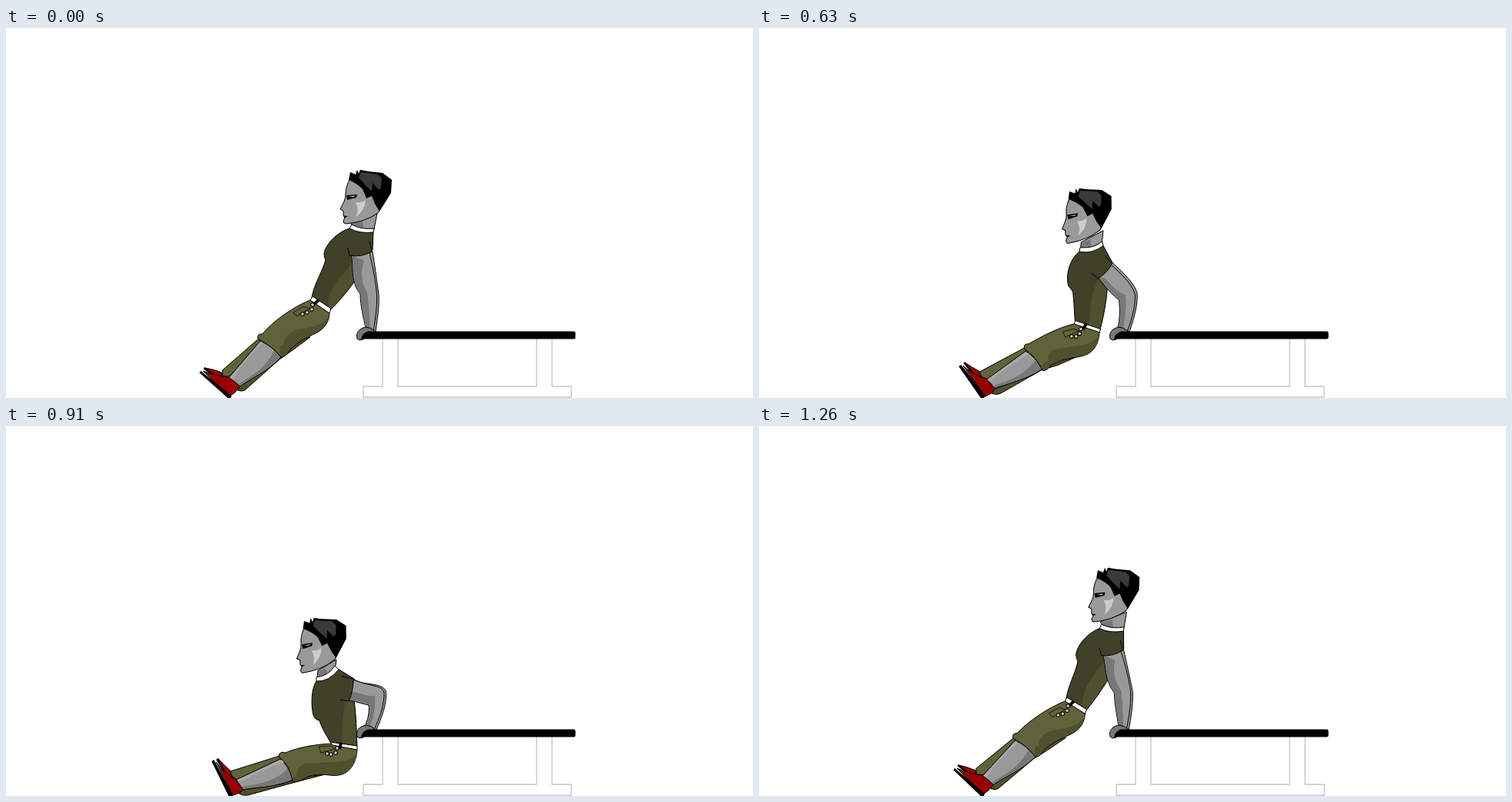
An HTML page that plays this animation: 970 px wide and 480 px high, repeating every 1680 ms.

```html
<!DOCTYPE html>
<html lang="en">
<head>
<meta charset="utf-8">
<title>Bench dip</title>
<style>
html, body { margin: 0; width: 100%; height: 100%; overflow: hidden; background: #fff; }
svg { display: block; width: 970px; height: 480px; }
</style>
</head>
<body>
<svg viewBox="0 0 970 480">
  <g id="body" stroke-linejoin="round"></g>
  <g id="head" stroke="#000" stroke-linejoin="round">
    <path fill="#999" d="M447 195Q441 206 441 214Q441 221 439 225L434 235L438 237V243L440 246L438 250Q438 254 441 254Q466 252 483 240L487 233L474 205L455 196Z"/>
    <g stroke="none">
      <path fill="#ccc" d="M454 226Q462 227 467 223Q466 237 454 245Q459 236 454 226Z"/>
      <path d="M447 187L454 190L456 184L458 189L460 184L470 186L489 188L501 197L500 214L485 238L479 228L475 218L468 221L463 209Q456 202 445 197Z"/>
      <path fill="#3a3a3a" d="M461 187L483 190L488 195L487 207L484 210L476 201L475 212L466 203L458 194Z"/>
      <path d="M442 217L456 216L455 220L443 223Z"/>
      <path fill="#ddd" d="M444 219L453 217.6L452 219Z"/>
      <path d="M438 243.5L444 244L440 246.5Z"/>
    </g>
  </g>
  <path fill="#777" stroke="#000" d="M467 388C458 390 454 396 456 403L459 405L464 404L466 397L480 394Q474 388 467 388Z"/>
  <g fill="none" stroke="#c8c8c8" stroke-width="1.4">
    <path d="M489 403V465H464V479H734V465H709V403M509 403V465H689V403"/>
  </g>
  <path d="M470 393.5H737Q739.5 393.5 739.5 396V401Q739.5 403.5 737 403.5H464L461 404.5Q462 396 470 393.5Z"/>
</svg>
<script>
const LOOP = 1680, HOLD = 420, STEP = 70;
const OLIVE = '#62623a', OLIVE_MID = '#50502e', OLIVE_DARK = '#414129';
const SKIN = '#999', SKIN_DARK = '#777', RED = '#900', BLACK = '#000';

// Position of each pose along the four key shapes; the last one overshoots.
const BLEND = [0, .2, .58, 1, 1.48, 2, 3, 3.8];
const HEAD_X = [447, 440, 428, 416, 403, 391.5, 387, 383.5];
const HEAD_Y = [187, 187, 190.5, 197, 212, 231, 253, 271];
const HEAD_TURN = [0, -1, -2.7, -4.2, -4.2, -4.2, -4.2, -4.2];

const parts = [];
const bodyGroup = document.getElementById('body');
const headGroup = document.getElementById('head');

function part(fill, stroke, width, ...keys) {
  const node = document.createElementNS('http://www.w3.org/2000/svg', 'path');
  node.setAttribute('fill', fill);
  node.setAttribute('stroke', stroke);
  node.setAttribute('stroke-width', width);
  bodyGroup.append(node);
  parts.push({ node, shape: keys[0], keys: keys.map(k => k.match(/[\d.]+/g).map(Number)) });
  return node;
}
const outlined = (fill, ...keys) => part(fill, BLACK, 1, ...keys);
const flat = (fill, ...keys) => part(fill, 'none', 0, ...keys);
const line = (color, width, ...keys) => part('none', color, width, ...keys);

// Far foot and leg
outlined(RED,
  'M258 441Q268 442 280 447L281 452L272 450Z',
  'M265 436Q275 441 285 446L287 452L280 451Z',
  'M270 432Q279 440 288 445L291 453L284 452Z',
  'M275 431Q283 440 291 447L294 455L287 454Z');
line(BLACK, 2.5,
  'M257 441L270 451', 'M264 436L275 448', 'M269 432L279 447', 'M274 432L283 447');
outlined(OLIVE,
  'M328 403L281 444L281 452L290 452L332 408Z',
  'M341 411L285 446L287 452L296 455L345 416Z',
  'M349 419L288 446L291 453L298 457L354 424Z',
  'M355 428L291 448L294 455L300 459L358 432Z');
outlined(OLIVE_MID,
  'M350 434L303 465L301 470Q306 472 310 470L355 430L372 418L395 401L380 400Z',
  'M355 444L305 467L302 473Q307 475 312 473L364 438L385 431L413 417L385 424Z',
  'M356 456L306 470L302 475Q308 478 314 476L370 450L392 444L412 437L385 440Z',
  'M356 465L307 472L303 477Q308 480 314 479L372 463L395 457L414 452L388 455Z');

// Near shin
outlined(SKIN,
  'M330 406L289 454Q298 459 304 465C318 454 340 446 357 427Q345 412 330 406Z',
  'M342 416L294 455Q300 460 305 467C325 458 345 452 366 437Q355 421 342 416Z',
  'M350 423L297 457Q303 462 306 468C325 464 345 462 369 449Q362 430 350 423Z',
  'M356 432L299 459Q304 465 307 472C325 468 345 470 372 459Q367 440 356 432Z');
flat('#aaa',
  'M331 407L290 454L294 457Q306 434 334 408Z',
  'M343 417L295 455L298 458Q318 438 347 419Z',
  'M351 424L298 457L301 460Q325 440 355 427Z',
  'M357 433L300 459L303 463Q330 446 361 436Z');
flat(SKIN_DARK,
  'M356 427C340 445 318 453 304 464L303 462C318 450 335 445 348 419Z',
  'M365 437C345 451 325 457 305 466L304 463C322 455 340 448 357 426Z',
  'M368 449C345 461 325 463 306 467L305 466C325 460 345 457 362 436Z',
  'M371 459C345 469 325 467 307 471L306 468C325 465 350 462 366 444Z');

// Near shoe
outlined(RED,
  'M256 445Q268 450 289 453Q298 459 304 465L297 473L290 478Z',
  'M262 440Q274 450 294 455Q300 460 306 467L301 473L294 477Z',
  'M268 436Q279 449 296 455Q302 461 307 470L302 475L294 479Z',
  'M273 436Q283 451 298 458Q303 465 308 472L303 476L295 479Z');
flat(BLACK,
  'M253 445L293 477L291 481L288 480L251 447Z',
  'M260 440L294 477L292 481L288 480L257 442Z',
  'M265 434L294 477L292 480L288 480L262 436Z',
  'M270 433L295 479L293 481L289 480L267 435Z');

// Neck
outlined(SKIN,
  'M447 252L482 240L478 261Q462 263 449 255Z',
  'M429 262L459 247L458 265Q445 272 429 267Z',
  'M407 295L434 280L432 291Q423 302 405 304Z',
  'M405 317L429 303L428 311Q419 324 404 326Z');
flat(SKIN_DARK,
  'M448 253L463 250L464 260Q455 259 449 255Z',
  'M430 263L443 258L442 269Q435 269 430 267Z',
  'M408 296L417 292L420 299Q413 303 406 304Z',
  'M406 318L414 314L417 320Q411 325 405 326Z');

// Shirt
outlined(OLIVE_DARK,
  'M446 260C430 265 415 280 413 293Q413 297 415 301C410 318 400 332 397 350L422 365C435 352 446 338 453 328L476 288L477 264Z',
  'M427 273C412 283 401 305 406 317Q411 320 410 325C411 340 407 355 407 370L438 383C445 362 451 345 454 333L464 292L459 269Z',
  'M405 308C396 315 394 335 397 353Q399 359 405 361C407 372 412 382 414 392L448 401C451 385 451 365 450 347L453 317L433 295Z',
  'M403 331C396 342 396 362 399 375Q401 381 407 382C410 393 417 402 421 410L456 415C455 400 455 375 452 357L452 328L431 315Z');
flat(OLIVE_MID,
  'M449 305C440 318 417 335 418 361L422 364C435 351 445 338 452 328Z',
  'M443 312C430 325 427 345 427 378L437 382C444 362 450 345 453 333Z',
  'M438 342C433 360 434 380 429 396L447 400C450 385 450 365 449 347Z',
  'M441 355C437 375 436 395 436 412L455 414C454 400 454 375 451 357Z');

// Trousers
outlined(OLIVE,
  'M395 353C372 362 345 382 333 397Q326 396 327 403C340 410 350 418 357 427Q364 427 368 418C378 408 390 402 402 396C413 391 420 381 420 370Z',
  'M407 373C385 380 355 398 345 405Q338 406 341 413C350 418 361 428 367 439Q373 437 376 431C390 424 400 421 413 417C428 411 435 402 437 385Z',
  'M414 395C390 398 370 408 356 415Q347 413 349 421C359 428 366 438 370 451Q377 452 380 446C392 437 405 437 422 436C438 436 447 425 448 403Z',
  'M423 412C400 413 375 418 363 424Q355 421 354 429C364 436 370 448 372 461Q380 462 384 459C395 452 405 451 420 453C440 456 454 445 456 420Z');
flat(OLIVE_MID,
  'M419 374C412 385 395 390 378 391C368 395 360 402 360 411Q353 412 357 426Q363 426 367 418C378 407 390 401 402 395C413 390 419 381 419 374Z',
  'M436 391C425 407 400 407 386 411C375 412 372 420 375 427Q366 427 367 438Q373 436 376 430C390 423 400 420 413 416C428 410 434 402 436 391Z',
  'M447 408C437 422 410 417 394 421C382 422 376 430 377 438Q367 441 370 450Q377 451 380 445C392 436 405 436 422 435C438 435 446 425 447 408Z',
  'M455 425C445 440 415 434 396 438C384 436 376 445 377 455Q370 455 372 460Q380 461 384 458C395 451 405 450 420 452C440 455 453 445 455 425Z');
line('#1c1c0c', 1,
  'M373 369L387 361L394 364L378 374Z',
  'M390 387L405 381L411 384L394 393Z',
  'M399 402L414 400L419 403L402 410Z',
  'M406 416L422 415L427 419L409 424Z');

// Belt, buckle and chain
outlined('#fff',
  'M398 348L422 364L420 370L395 353Z',
  'M408 369L439 382L437 386L406 373Z',
  'M414 391L449 400L447 404L413 396Z',
  'M421 410L456 415L456 420L424 414Z');
line(BLACK, 4,
  'M399 359L406 353', 'M416 380L421 373', 'M426 403L430 394', 'M433 419L435 411');
for (const [color, width] of [[BLACK, 5.6], ['#ccc', 3.6]]) {
  line(color, width,
    'M398 359h.01M397 365h.01M391 369h.01M385 371h.01',
    'M414 380h.01M412 386h.01M408 390h.01M402 391h.01',
    'M422 402h.01M421 408h.01M416 411h.01M410 410h.01',
    'M430 418h.01M428 424h.01M422 426h.01M417 425h.01').setAttribute('stroke-linecap', 'round');
}

// Arms, far one first
outlined(SKIN,
  'M476 290C479 308 481 325 484 345C485 362 482 378 480 394L470 394L472 343L472 291Z',
  'M464 292C470 305 482 322 490 343C490 362 486 380 481 394L472 394L476 345L461 295Z',
  'M454 318C468 326 487 330 492 343C495 358 486 378 481 394L472 394L480 346L452 320Z',
  'M452 329C465 337 486 332 493 343C496 358 487 380 481 394L472 394L481 350L451 335Z');
outlined(SKIN,
  'M448 295C452 306 446 328 460 345C460 360 464 375 467 389L477 394C480 375 483 355 481 340C479 322 475 305 472 291Z',
  'M441 307C446 320 455 335 466 348C468 362 468 375 466 389L478 394C484 378 488 360 487 345C480 328 473 312 461 295Z',
  'M440 342C449 347 458 355 469 358C470 370 469 380 466 389L478 394C484 378 490 365 490 346C488 334 468 328 452 319Z',
  'M445 356C455 357 464 361 471 362C472 372 470 381 466 389L478 394C484 380 490 368 491 350C492 335 478 340 451 329Z');
flat(SKIN_DARK,
  'M449 295C453 306 447 328 461 345C461 360 465 375 467 389L473 392C472 372 471 358 469 343C461 330 460 315 465 302Z',
  'M442 307C447 320 456 335 467 348C469 362 469 375 467 389L473 392C475 375 476 360 475 345C462 335 456 322 452 312Z',
  'M441 341C450 346 459 354 470 357C471 370 470 380 467 389L472 392C476 380 478 365 477 348C468 350 456 344 448 339Z',
  'M446 355C456 356 465 360 472 361C473 372 471 381 467 389L472 392C477 380 480 365 479 350C470 352 458 345 450 345Z');

// Sleeve and collar
outlined(OLIVE_DARK,
  'M444 285L446 295Q461 298 475 290L472 277',
  'M433 300L439 309Q455 305 464 293L457 283',
  'M430 337L441 342Q449 333 453 318L440 309',
  'M434 355L445 357Q451 345 451 328L436 325');
outlined('#fff',
  'M449 255Q462 262 478 260L477 265Q459 267 446 260Z',
  'M428 267Q445 272 458 264L459 270Q443 278 427 273Z',
  'M405 304Q423 302 432 291L434 296Q422 310 404 309Z',
  'M403 326Q419 324 427 311L432 316Q419 332 403 331Z');

function poseAt(time) {
  if (time < HOLD) return 0;
  const step = Math.min(13, 1 + Math.floor((time - HOLD) / STEP));
  return Math.min(step, 14 - step);
}

function draw(pose) {
  const blend = BLEND[pose];
  const from = Math.min(2, Math.floor(blend));
  const mix = blend - from;
  for (const { node, shape, keys } of parts) {
    let i = 0;
    node.setAttribute('d', shape.replace(/[\d.]+/g, () => {
      const a = keys[from][i], b = keys[from + 1][i++];
      return (a + (b - a) * mix).toFixed(2);
    }));
  }
  const dx = HEAD_X[pose] - HEAD_X[0], dy = HEAD_Y[pose] - HEAD_Y[0];
  headGroup.setAttribute('transform',
    `translate(${dx} ${dy}) rotate(${HEAD_TURN[pose]} ${HEAD_X[0]} ${HEAD_Y[0]})`);
}

function tick() {
  draw(poseAt(performance.now() % LOOP));
  requestAnimationFrame(tick);
}
tick();
</script>
</body>
</html>
```
